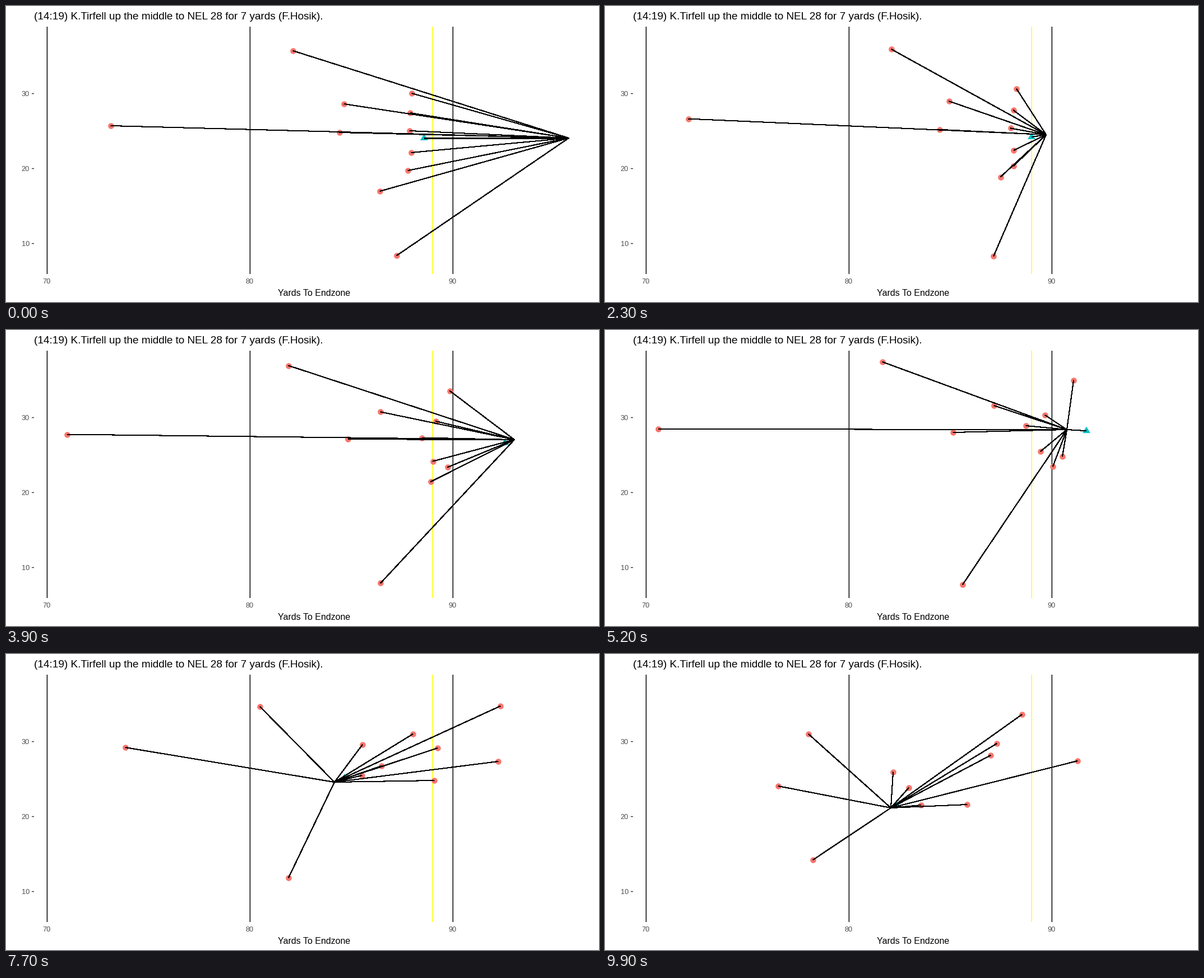
A matplotlib script for the animation above (10 s loop, 1058 px wide and 529 px high).

```python
import numpy as np
import matplotlib.pyplot as plt
from matplotlib.animation import FuncAnimation
from matplotlib.collections import LineCollection
from matplotlib.patches import Polygon

W, H, DPI = 1058, 529, 128
PX = 72 / DPI  # points per pixel
FRAMES, INTERVAL = 100, 100
REACT, SNAP = 15, 20
LAG = 3  # frames the ball trails the player carrying it
DEEP_BACK = (1004, 236)
TRIANGLE = np.array([[0, -7.5], [7, 4], [-7, 4]])

plt.rcParams["font.family"] = "Liberation Sans"


def path(times, points):
    """Smooth motion without overshoot: starts from rest, pauses where it turns."""
    t, p = np.array(times, float), np.array(points, float)
    speed = np.diff(p, axis=0) / np.diff(t)[:, None]
    a, b = speed[:-1], speed[1:]
    same_way = a * b > 0
    through = np.where(same_way, 2 * a * b / np.where(same_way, a + b, 1), 0)
    slope = np.vstack([0 * speed[:1], through, speed[-1:]])

    f = np.clip(np.arange(FRAMES), t[0], t[-1])
    i = np.clip(np.searchsorted(t, f, side="right") - 1, 0, len(t) - 2)
    h = (t[i + 1] - t[i])[:, None]
    u = (f - t[i])[:, None] / h
    ease = u * u * (3 - 2 * u)
    return (p[i] + ease * (p[i + 1] - p[i])
            + h * u * (1 - u) * ((1 - u) * slope[i] - u * slope[i + 1]))


def defender(*points, start=REACT):
    """Line-up spot, spot at the hand-off, pursuit, end of the play."""
    return path([start, 52, 77, 99], points)


defenders = np.stack([
    defender((512, 80), (495, 57), (453, 94), (363, 143)),
    defender((724, 156), (836, 90), (882, 93), (744, 108)),
    defender((603, 175), (694, 135), (636, 162), (514, 211)),
    defender((721, 191), (785, 152), (770, 168), (688, 181)),
    defender((187, 214), (95, 177), (213, 167), (309, 236), start=0),
    defender((595, 226), (621, 183), (635, 217), (564, 270)),
    defender((720, 223), (751, 171), (726, 143), (699, 160)),
    defender((723, 262), (777, 217), (670, 200), (542, 239)),
    defender((717, 294), (816, 226), (764, 226), (646, 269)),
    defender((667, 331), (799, 244), (878, 192), (843, 191), start=0),
    defender((697, 446), (638, 455), (504, 400), (371, 368)),
], axis=1)

carrier = path([SNAP - LAG, 23, 39, 42, 52, 62, 77, 99],
               [(746, 236), (787, 230), (907, 196), (917, 192), (824, 178),
                (714, 190), (586, 229), (510, 275)])
ball = carrier[np.maximum(np.arange(FRAMES) - LAG, 0)]
hub = carrier.copy()
hub[:SNAP] = DEEP_BACK  # the lines switch to the carrier at the snap

fig = plt.figure(figsize=(W / DPI, H / DPI), dpi=DPI, facecolor="white")
ax = fig.add_axes([0, 0, 1, 1])
ax.set(xlim=(0, W), ylim=(H, 0))
ax.axis("off")


def rule(xs, ys, color, width):
    ax.plot(xs, ys, color=color, lw=width * PX, snap=False,
            solid_capstyle="butt", zorder=1)


def label(x, y, text, size, color="black", ha="center"):
    ax.text(x, y, text, fontsize=size * PX, color=color, ha=ha, va="baseline")


def yard_x(yards):
    return 73.4 + 36.2 * (yards - 70)


for yards in (70, 80, 90):
    rule([yard_x(yards)] * 2, [37, 479], "black", 1.5)
    label(yard_x(yards) - 0.5, 496, yards, 12.8, "#4D4D4D")
rule([yard_x(89)] * 2, [37, 479], "#FFFF00", 1.5)
for value in (10, 20, 30):
    y = 424.5 - 13.4 * (value - 10)
    rule([46, 50], [y, y], "#333333", 1.4)
    label(42, y + 4.5, value, 12.8, "#4D4D4D", "right")
label(549.5, 518, "Yards To Endzone", 16)
label(50, 24, "(14:19) K.Tirfell up the middle to NEL 28 for 7 yards (F.Hosik).",
      19, ha="left")

dots, = ax.plot([], [], "o", ms=10.6 * PX, color="#F8766D", mew=0, zorder=2)
marker = Polygon(np.zeros((3, 2)), facecolor="#00BFC4", lw=0, zorder=2.5)
ax.add_patch(marker)
links = LineCollection([], colors="black", linewidths=1.05 * PX,
                       antialiaseds=False, zorder=3)
ax.add_collection(links, autolim=False)


def update(frame):
    spots = defenders[frame]
    dots.set_data(spots[:, 0], spots[:, 1])
    marker.set_xy(ball[frame] + TRIANGLE)
    links.set_segments([[spot, hub[frame]] for spot in (*spots, ball[frame])])
    return dots, marker, links


anim = FuncAnimation(fig, update, frames=FRAMES, interval=INTERVAL,
                     repeat=True, repeat_delay=0, blit=False)
plt.show()
```
